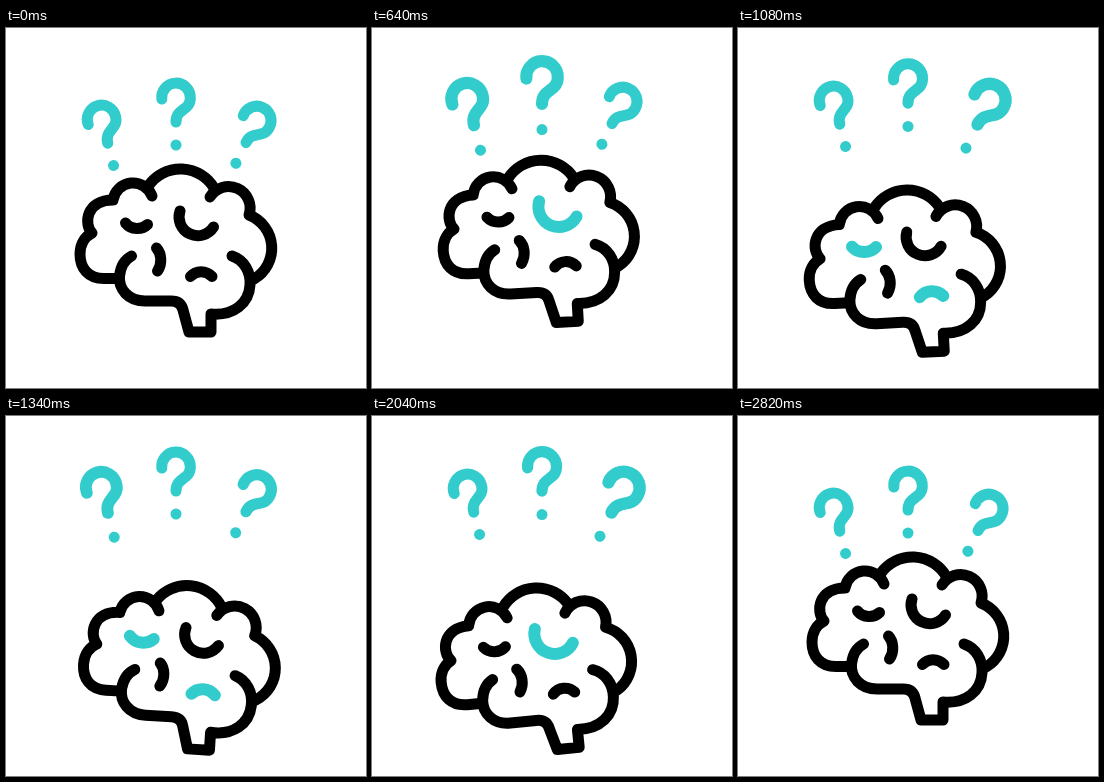
Animation of 360x360 px, one loop 3.42 s. Source, as an HTML page:

```html
<!DOCTYPE html>
<html lang="en">
<head>
<meta charset="utf-8">
<title>Confused brain</title>
<style>
  html, body { margin: 0; width: 100%; height: 100%; overflow: hidden; background: #fff; }
  svg { display: block; width: 100%; height: 100%; }
  path { fill: none; stroke-width: 11; stroke-linecap: round; stroke-linejoin: round; }
  #brain { stroke: #000; }
  #marks path { stroke: #3cc; }
  #marks circle { fill: #3cc; }
</style>
</head>
<body>
<svg viewBox="0 0 360 360">
  <g id="marks"></g>
  <g id="brain">
    <path d="M143 157A39 39 0 0 1 208 160"/>
    <path d="M146 168A20.3 20.3 0 0 0 107 172C80 172 77.5 196 86 205C80 208 74 215 74 226C74 240 82 250.5 98 250.5H113"/>
    <path d="M204 169A21.6 21.6 0 0 1 243 187A35.6 35.6 0 0 1 248 251"/>
    <path d="M125.5 228C118 232 114.5 239 113.5 248C112.5 261 122 273 139 273H165Q175 273 177 282L183 304H205V286C228 288 243 275 244 257C245 244 238 232 226 228"/>
  </g>
</svg>
<script>
const LOOP = 3420;
const NS = "http://www.w3.org/2000/svg";
const brain = document.getElementById("brain");
const marksBox = document.getElementById("marks");
const HOOK = "M-14.2 1A14.3 14.3 0 1 1 14.3 0C14.3 13 0 10 0 24";

// [time, value] stops, eased in and out between neighbours
const TILT = [[420, 0], [850, -6], [1560, 6.2], [2100, -6], [2480, 0]];
const DROP = [[160, 0], [700, -9], [1240, 28.5], [1620, 26.5], [2100, 31], [2710, 0]];
const RISE = [[160, 0], [600, -19], [2490, -19], [2820, 0]];

const marks = [
  { x: 95.7, y: 92, turn: -14.6, beats: [540, 1510] },
  { x: 170, y: 70, turn: 0, beats: [760, 1730] },
  { x: 250.5, y: 93, turn: 26, beats: [1030, 2000] }
];

const folds = [
  { x: 130.5, y: 197.5, d: "M119.5 195C125 202 136 202 141.5 196.5", on: [[900, 1780], [2300, 2660]] },
  { x: 190.5, y: 196, d: "M174 183A18.7 18.7 0 0 0 207.5 199", on: [[420, 880], [1860, 2280]] },
  { x: 153, y: 231.5, d: "M150.5 220C155.5 225.5 156.5 235.5 151.5 243", on: [[1380, 1820]] },
  { x: 195, y: 245.5, d: "M184.5 248.5C190 242 200 242 206 248.5", on: [[920, 1800]] }
];

function add(parent, tag, attrs) {
  const el = document.createElementNS(NS, tag);
  for (const key in attrs) el.setAttribute(key, attrs[key]);
  return parent.appendChild(el);
}

for (const m of marks) {
  m.el = add(marksBox, "g", {});
  m.hook = add(m.el, "path", { d: HOOK });
  m.dot = add(m.el, "circle", { r: 5.5 });
}
for (const f of folds) f.el = add(brain, "path", { d: f.d });

const clamp = v => Math.max(0, Math.min(1, v));
const ease = p => (1 - Math.cos(Math.PI * clamp(p))) / 2;

function track(stops, t) {
  let value = stops[0][1];
  for (let i = 1; i < stops.length; i++) {
    const [t0, v0] = stops[i - 1], [t1, v1] = stops[i];
    value += (v1 - v0) * ease((t - t0) / (t1 - t0));
  }
  return value;
}

const beat = (t, peak) => ease(1 - Math.abs(t - peak) / 400);
const glow = (t, [from, to]) => ease(Math.min(t - from, to - t) / 120);

// scale around a point
const grow = (s, x, y) => `translate(${x} ${y}) scale(${s}) translate(${-x} ${-y})`;

function draw(t) {
  brain.setAttribute("transform",
    `translate(0 ${track(DROP, t)}) rotate(${track(TILT, t)} 171 280)`);

  const rise = track(RISE, t);
  for (const m of marks) {
    const k = Math.max(...m.beats.map(b => beat(t, b)));
    m.el.setAttribute("transform", `translate(${m.x} ${m.y + rise}) rotate(${m.turn})`);
    m.hook.setAttribute("transform", grow(1 + 0.125 * k, 0, 15));
    m.dot.setAttribute("cy", 47 + 4.5 * k);
  }

  for (const f of folds) {
    const g = Math.max(...f.on.map(span => glow(t, span)));
    const c = Math.round(204 * g);
    f.el.setAttribute("transform", grow(1 + 0.09 * g, f.x, f.y));
    f.el.setAttribute("stroke", `rgb(${Math.round(51 * g)},${c},${c})`);
  }
}

const start = performance.now();
function tick() {
  draw((performance.now() - start) % LOOP);
  requestAnimationFrame(tick);
}
tick();
</script>
</body>
</html>
```
